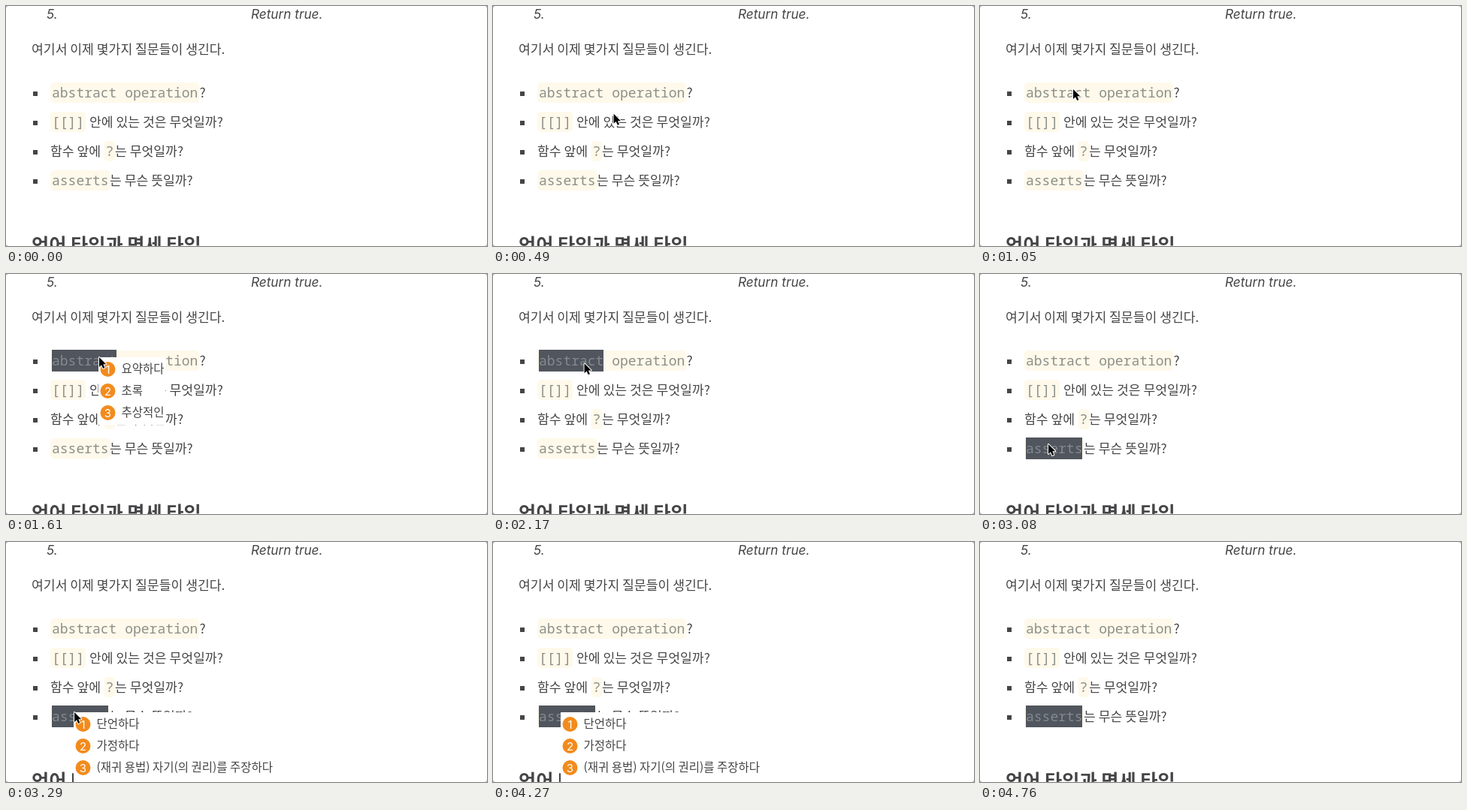
These frames come from a looping animation (640x320 px, 4.83 s). An HTML page with a canvas:

```html
<!DOCTYPE html>
<html lang="ko">
<head>
<meta charset="utf-8">
<style>
  html, body { margin: 0; width: 100%; height: 100%; overflow: hidden; background: #fff; }
  canvas { display: block; width: 640px; height: 320px; }
</style>
</head>
<body>
<canvas id="stage" width="640" height="320"></canvas>
<script>
const ctx = document.getElementById('stage').getContext('2d');
const LOOP = 4830, STEP = 70;
const INK = '#454547', CODE_INK = '#8d8f8a', CODE_BG = '#fef9ea';
const KOREAN = '"Noto Sans CJK KR", "Noto Sans CJK", sans-serif';
const BODY = '300 17.2px ' + KOREAN;
const MONO = '18px "Noto Sans Mono", monospace';
const ITALIC = 'italic 17.2px Inter, sans-serif';

// Cursor stops: [time, x, y]
const PATH = [
  [70, 376, 312], [560, 148, 134], [770, 148, 134], [1050, 124, 111],
  [2100, 124, 111], [2520, 91, 222], [2870, 91, 222], [3080, 91, 227],
  [3710, 91, 227], [4200, 249, 318]
];
const SELECTIONS = [
  { from: 1260, to: 2940, x: 61, y: 101, w: 86 },
  { from: 3080, to: LOOP, x: 61, y: 218, w: 75 }
];
const POPUPS = [
  { from: 1330, to: 2170, x: 123, y: 111, w: 89, h: 90,
    items: ['요약하다', '초록', '추상적인'] },
  { from: 3220, to: 4340, x: 90, y: 227, w: 265, h: 93,
    items: ['단언하다', '가정하다', '(재귀 용법) 자기(의 권리)를 주장하다'] }
];

const active = (item, t) => t >= item.from && t < item.to;

function text(str, x, y, font = BODY, color = INK) {
  ctx.font = font;
  ctx.fillStyle = color;
  ctx.fillText(str, x, y);
}

function rect(x, y, w, h, color, radius = 0) {
  ctx.fillStyle = color;
  ctx.beginPath();
  ctx.roundRect(x, y, w, h, radius);
  ctx.fill();
}

function code(str, x, baseline) {
  rect(x - 2, baseline - 20, str.length * 10.8 + 4, 27, CODE_BG, 5);
  text(str, x, baseline, MONO, CODE_INK);
}

function drawPage() {
  rect(0, 0, 640, 320, '#fff');
  text('5.', 54, 17, ITALIC);
  text('Return true.', 326, 17, ITALIC);
  text('여기서 이제 몇가지 질문들이 생긴다.', 34, 63.5);
  for (let row = 0; row < 4; row++) rect(36, 114 + row * 39, 6, 6, INK);
  code('abstract operation', 61, 122);
  text('?', 257.5, 122);
  code('[[]]', 61, 161);
  text('안에 있는 것은 무엇일까?', 111, 161);
  text('함수 앞에', 59, 200);
  code('?', 132.5, 200);
  text('는 무엇일까?', 145, 200);
  code('asserts', 61, 239);
  text('는 무슨 뜻일까?', 138, 239);
  text('언어 타입과 명세 타입', 34, 328, 'bold 25.2px ' + KOREAN);
}

function drawSelection({ x, y, w }) {
  rect(x, y, w, 29, '#51555d');
  text(y < 200 ? 'abstract' : 'asserts', x, y + 21, MONO, '#818b8f');
}

function drawPopup({ x, y, w, h, items }) {
  rect(x, y, w, h, '#fff');
  items.forEach((item, i) => {
    const cy = y + 16 + i * 29;
    rect(x + 2.5, cy - 10, 20, 20, '#f28b1d', 10);
    ctx.textAlign = 'center';
    text(i + 1, x + 12.5, cy + 5.5, '15px Inter, sans-serif', '#fff');
    ctx.textAlign = 'left';
    text(item, x + 30.5, cy + 5, '300 15.5px ' + KOREAN);
  });
}

function cursorAt(t) {
  const i = PATH.findIndex((stop, k) => k > 0 && t <= stop[0]);
  const [t0, x0, y0] = PATH[i - 1], [t1, x1, y1] = PATH[i];
  const p = (t - t0) / (t1 - t0), ease = p * p * (3 - 2 * p);
  return [x0 + (x1 - x0) * ease, y0 + (y1 - y0) * ease];
}

function drawCursor(t) {
  if (t < PATH[0][0] || t > PATH[PATH.length - 1][0]) return;
  const beam = t > 2170 && t < 3080;
  const shape = new Path2D(beam
    ? 'M-3.5-8Q0-8 0-6Q0-8 3.5-8M0-6V6M-3.5 8Q0 8 0 6Q0 8 3.5 8M-2 1H2'
    : 'M0 0V13L3 10.2L5.2 15L7.4 14L5.3 9.3H9.2Z');
  ctx.save();
  ctx.translate(...cursorAt(t));
  ctx.lineJoin = 'round';
  ctx.strokeStyle = '#fff';
  ctx.lineWidth = beam ? 3 : 2;
  ctx.stroke(shape);
  if (beam) {
    ctx.strokeStyle = '#222';
    ctx.lineWidth = 1.2;
    ctx.stroke(shape);
  } else {
    ctx.fillStyle = '#000';
    ctx.fill(shape);
  }
  ctx.restore();
}

function drawCorners() {
  ctx.fillStyle = '#b5b5b5';
  ctx.beginPath();
  ctx.rect(0, 0, 640, 320);
  ctx.roundRect(0, 0, 640, 320, 4);
  ctx.fill('evenodd');
}

const start = performance.now();
function frame() {
  const elapsed = (performance.now() - start) % LOOP;
  const t = Math.floor(elapsed / STEP) * STEP;
  drawPage();
  SELECTIONS.filter(s => active(s, t)).forEach(drawSelection);
  POPUPS.filter(p => active(p, t)).forEach(drawPopup);
  drawCursor(t);
  drawCorners();
  requestAnimationFrame(frame);
}
frame();
</script>
</body>
</html>
```
